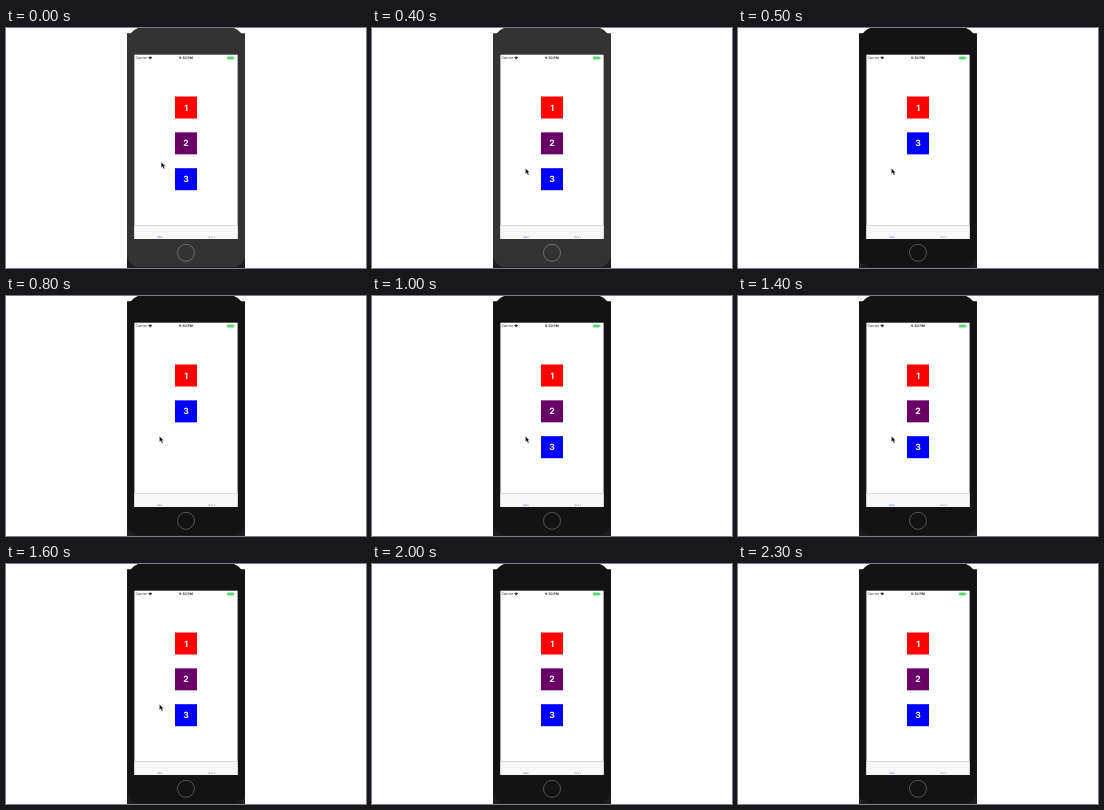
An HTML page that plays this animation: 360x240 px, repeating every 2.4 s.

```html
<!DOCTYPE html>
<html lang="en">
<head>
<meta charset="utf-8">
<style>
  html, body { margin: 0; width: 100%; height: 100%; overflow: hidden; background: #fff; }
  svg { display: block; width: 360px; height: 240px; }
  text { font-family: Inter, Roboto, sans-serif; text-anchor: middle; text-rendering: geometricPrecision; }
  .tile text { font-size: 8.6px; font-weight: 700; fill: #fff; }
  .status { font-size: 3.4px; fill: #333; }
  .tab { font-size: 2.5px; }
</style>
</head>
<body>
<svg viewBox="0 0 360 240">
  <path fill="#1c1d24" d="M121 240V5.5H239V240Z"/>
  <path id="body" d="M121 5.5H124.5Q127 1.8 132 0H228Q233 1.8 235.5 5.5H239V229Q237 236 230 239H130Q123 236 121 229Z"/>
  <rect x="128.4" y="26.7" width="103.2" height="184.2" fill="#fff"/>

  <g class="status">
    <text x="135.3" y="31.2" font-size="3.6">Carrier</text>
    <text x="180" y="31.2" font-weight="700">9:50 PM</text>
    <path d="M142.2 29.2Q144.2 27.6 146.2 29.2L144.2 31.4Z"/>
    <rect x="221" y="28.5" width="6.8" height="3" rx=".7" fill="#5bd770"/>
    <rect x="228.5" y="29.4" width=".7" height="1.2" fill="#999"/>
  </g>

  <g id="tiles"></g>

  <rect x="128.4" y="197" width="103.2" height="13.9" fill="#f8f8f8"/>
  <rect x="128.4" y="197" width="103.2" height=".5" fill="#b8b8b8"/>
  <text class="tab" x="154" y="209.9" fill="#1668d8">Item</text>
  <text class="tab" x="205.7" y="209.9" fill="#888">Item 2</text>

  <circle id="home" cx="180" cy="224.8" r="8.5" fill="none" stroke-width=".9"/>
  <path id="cursor" fill="#000" stroke="#fff" stroke-width=".4"
        d="M0 0V5.8L1.4 4.6L2.5 7L3.6 6.5L2.6 4.2H4.3Z"/>
</svg>
<script>
  const LOOP = 2400, STEP = 100;
  const get = id => document.getElementById(id);
  const body = get("body"), home = get("home"), cursor = get("cursor");

  get("tiles").innerHTML = ["#f00", "#680068", "#00f"].map((color, i) =>
    `<g class="tile"><rect x="-11" y="-11" width="22" height="22" fill="${color}"/>
     <text y="3.1">${i + 1}</text></g>`).join("");
  const tiles = [...document.querySelectorAll(".tile")];

  const place = (el, x, y) => el.setAttribute("transform", `translate(${x} ${y})`);
  const show = (el, on) => el.setAttribute("visibility", on ? "visible" : "hidden");
  const ease = p => p * p * (3 - 2 * p);

  function draw(time) {
    const t = Math.floor((time % LOOP) / STEP) * STEP;
    const collapsed = t >= 500 && t < 1000;
    const focused = t >= 500;

    body.setAttribute("fill", focused ? "#131313" : "#333");
    home.setAttribute("stroke", focused ? "#5c5c5c" : "#747474");

    tiles.forEach((tile, i) => {
      const row = collapsed && i === 2 ? 1 : i;
      place(tile, 180, 79.5 + 35.85 * row);
      show(tile, !(collapsed && i === 1));
    });

    const move = ease(Math.min(t / 300, 1));
    place(cursor, 155.2 - 1.8 * move, 134 + 6.2 * move);
    show(cursor, t < 2000);
  }

  const start = performance.now();
  function frame() {
    draw(performance.now() - start);
    requestAnimationFrame(frame);
  }
  draw(0);
  requestAnimationFrame(frame);
</script>
</body>
</html>
```
